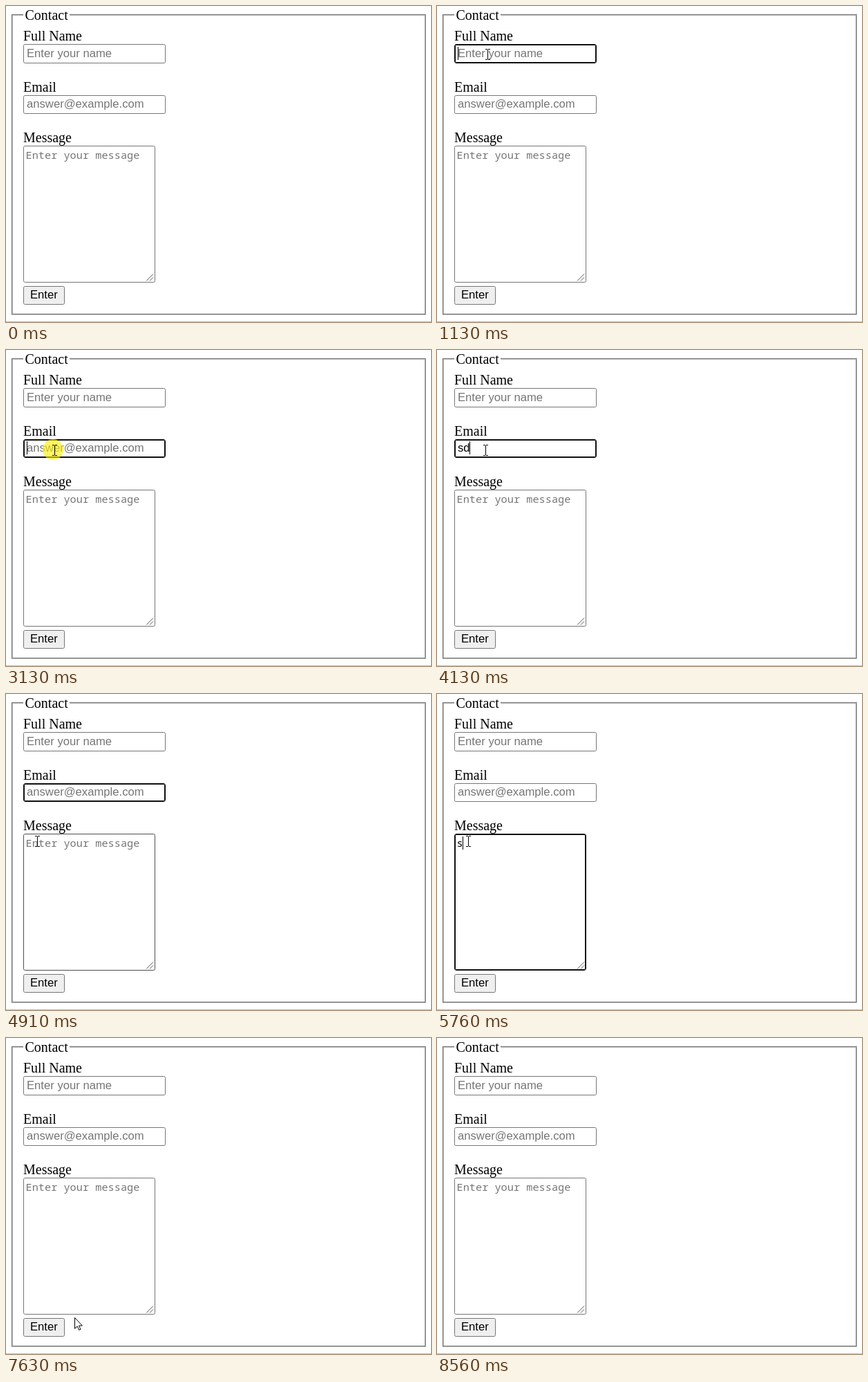
An HTML page that plays this animation: 615 px wide and 457 px high, repeating every 8.78 s.

```html
<!DOCTYPE html>
<html lang="en">
<head>
<meta charset="utf-8">
<title>Contact form</title>
<style>
  html, body { margin: 0; width: 615px; height: 457px; overflow: hidden; background: #fff; }
  body { position: relative; }
  div, svg { position: absolute; box-sizing: border-box; }
  .group { left: 8px; top: 12px; width: 600px; height: 435px; border: 2px groove #c0c0c0; }
  .rule { left: 0; top: 456px; width: 615px; height: 1px; background: #c0c0c0; }
  .gap { left: 25px; top: 10px; width: 67px; height: 6px; background: #fff; }
  .box { left: 25px; border: 1px solid #767676; border-radius: 2.5px; background: #fff; }
  .box.hover { border-color: #4f4f4f; }
  .box.focus { border-color: #101010; border-radius: 3px; box-shadow: inset 0 0 0 1px #101010; }
  #name { top: 55px; width: 206px; height: 28px; }
  #email { top: 129px; width: 206px; height: 27px; }
  #message { top: 202px; width: 191px; height: 198px; }
  #enter { top: 405px; width: 60px; height: 27px; background: #efefef; }
  #enter.hover { background: #e5e5e5; }
  svg { left: 0; top: 0; }
  text { white-space: pre; }
  .label { font: 20px "Liberation Serif", "Times New Roman", serif; }
  .sans { font: 16.667px "Liberation Sans", Arial, sans-serif; }
  .mono { font: 15.28px "Noto Sans Mono", monospace; }
  .hint { fill: #757575; }
  .grip { stroke: #555; fill: none; }
  #glow { fill: #fff000; fill-opacity: .6; }
  #beam { stroke: #000; fill: none; shape-rendering: crispEdges; }
  #arrow { stroke: #000; fill: #fff; }
</style>
</head>
<body>
<div class="group"></div>
<div class="gap"></div>
<div class="rule"></div>
<div class="box" id="name"></div>
<div class="box" id="email"></div>
<div class="box" id="message"></div>
<div class="box" id="enter"></div>

<svg width="615" height="457">
  <g class="label">
    <text x="27.5" y="20">Contact</text>
    <text x="25" y="50">Full Name</text>
    <text x="25" y="124">Email</text>
    <text x="25" y="197">Message</text>
  </g>
  <text class="sans hint" id="name-hint" x="30" y="74">Enter your name</text>
  <text class="sans hint" id="email-hint" x="30" y="147">answer@example.com</text>
  <text class="mono hint" id="message-hint" x="28.5" y="221">Enter your message</text>
  <text class="sans" x="35" y="423">Enter</text>
  <path class="grip" d="M203 397.5L213 387.5M208 397.5L213 392.5"/>
  <text id="typed"></text>
  <rect id="caret" width="1" height="19"/>
  <circle id="glow" r="15"/>
  <path id="beam" d="M-3 -7.5H0M1 -7.5H4M.5 -7V7M-3 7.5H0M1 7.5H4"/>
  <path id="arrow" d="M.5 .5V16.3L4.2 12.9L6.7 18.4L9 17.4L6.6 12H11.4Z"/>
</svg>

<script>
const LOOP = 8780, STEP = 75;
const $ = id => document.getElementById(id);

const fields = {
  name: { x: 30, base: 74, caretY: 59, font: 'sans' },
  email: { x: 30, base: 147, caretY: 132, font: 'sans' },
  message: { x: 28.5, base: 221, caretY: 206, font: 'mono' }
};

// start time, focused field, typed text, caret shown
const states = [
  [0, '', '', 0],
  [980, 'name', '', 1], [1590, 'name', 's', 1], [1670, 'name', 'sd', 1],
  [2130, 'name', '', 1], [2670, 'name', '', 0],
  [3130, 'email', '', 1], [3590, 'email', '', 0], [3900, 'email', 's', 1],
  [4130, 'email', 'sd', 1], [4590, 'email', 's', 0], [4760, 'email', '', 0],
  [5220, 'message', '', 1], [5760, 'message', 's', 1], [5910, 'message', 'sd', 1],
  [6060, 'message', 'sd', 0], [6460, 'message', 's', 1], [6530, 'message', 's', 0],
  [6700, 'message', '', 0],
  [7310, '', '', 0]
];

// start time, number of steps, waypoints
const moves = [
  [0, 1, [-40, 218]],
  [70, 12, [0, 218], [120, 200], [243, 140], [150, 85], [73, 70]],
  [2130, 6, [73, 74], [72, 136]],
  [2670, 5, [72, 138], [70, 145]],
  [4760, 3, [66, 158], [45, 213]],
  [6700, 7, [45, 235], [45, 358], [50, 417]],
  [7480, 3, [85, 392], [92, 398], [99, 404]],
  [7705, 9, [130, 405], [340, 420], [535, 438]],
  [8400, 3, [556, 445], [576, 451], [596, 460]]
];

// start, end, centre
const clicks = [
  [980, 1130, 73, 65], [3130, 3210, 68, 144],
  [5220, 5370, 45, 212], [7310, 7480, 50, 423]
];

const latest = (rows, t) => rows.findLast(row => row[0] <= t);
const show = (el, on) => el.style.display = on ? '' : 'none';

function pointerAt(t) {
  const [start, steps, ...path] = latest(moves, t);
  const k = Math.min(Math.floor((t - start) / STEP), steps - 1);
  const u = steps > 1 ? k / (steps - 1) * (path.length - 1) : 0;
  const i = Math.floor(u), a = path[i], b = path[i + 1] || a;
  return a.map((v, j) => Math.round(v + (b[j] - v) * (u - i)));
}

function drawFields(t) {
  const [, active, text, caretOn] = latest(states, t);
  for (const id in fields) {
    $(id).classList.toggle('focus', id === active);
    show($(id + '-hint'), id !== active || !text);
  }
  const typed = $('typed'), caret = $('caret'), f = fields[active];
  typed.textContent = text;
  show(caret, caretOn);
  if (!f) return;
  typed.setAttribute('class', f.font);
  typed.setAttribute('x', f.x);
  typed.setAttribute('y', f.base);
  const width = text ? typed.getComputedTextLength() : 0;
  caret.setAttribute('x', Math.floor(f.x + width));
  caret.setAttribute('y', f.caretY);
}

function drawPointer(t) {
  const [x, y] = pointerAt(t);
  let over = '';
  for (const box of document.querySelectorAll('.box')) {
    const dx = x - box.offsetLeft, dy = y - box.offsetTop;
    const hit = dx >= 0 && dy >= 0 && dx < box.offsetWidth && dy < box.offsetHeight;
    box.classList.toggle('hover', hit);
    if (hit) over = box.id;
  }
  const isBeam = over in fields;
  show($('beam'), isBeam);
  show($('arrow'), !isBeam);
  $(isBeam ? 'beam' : 'arrow').setAttribute('transform', `translate(${x} ${y})`);

  const click = clicks.find(c => t >= c[0] && t < c[1]);
  show($('glow'), click);
  if (click) {
    $('glow').setAttribute('cx', click[2]);
    $('glow').setAttribute('cy', click[3]);
  }
}

const begin = performance.now();
function draw() {
  const t = (performance.now() - begin) % LOOP;
  drawFields(t);
  drawPointer(t);
  requestAnimationFrame(draw);
}
draw();
</script>
</body>
</html>
```
